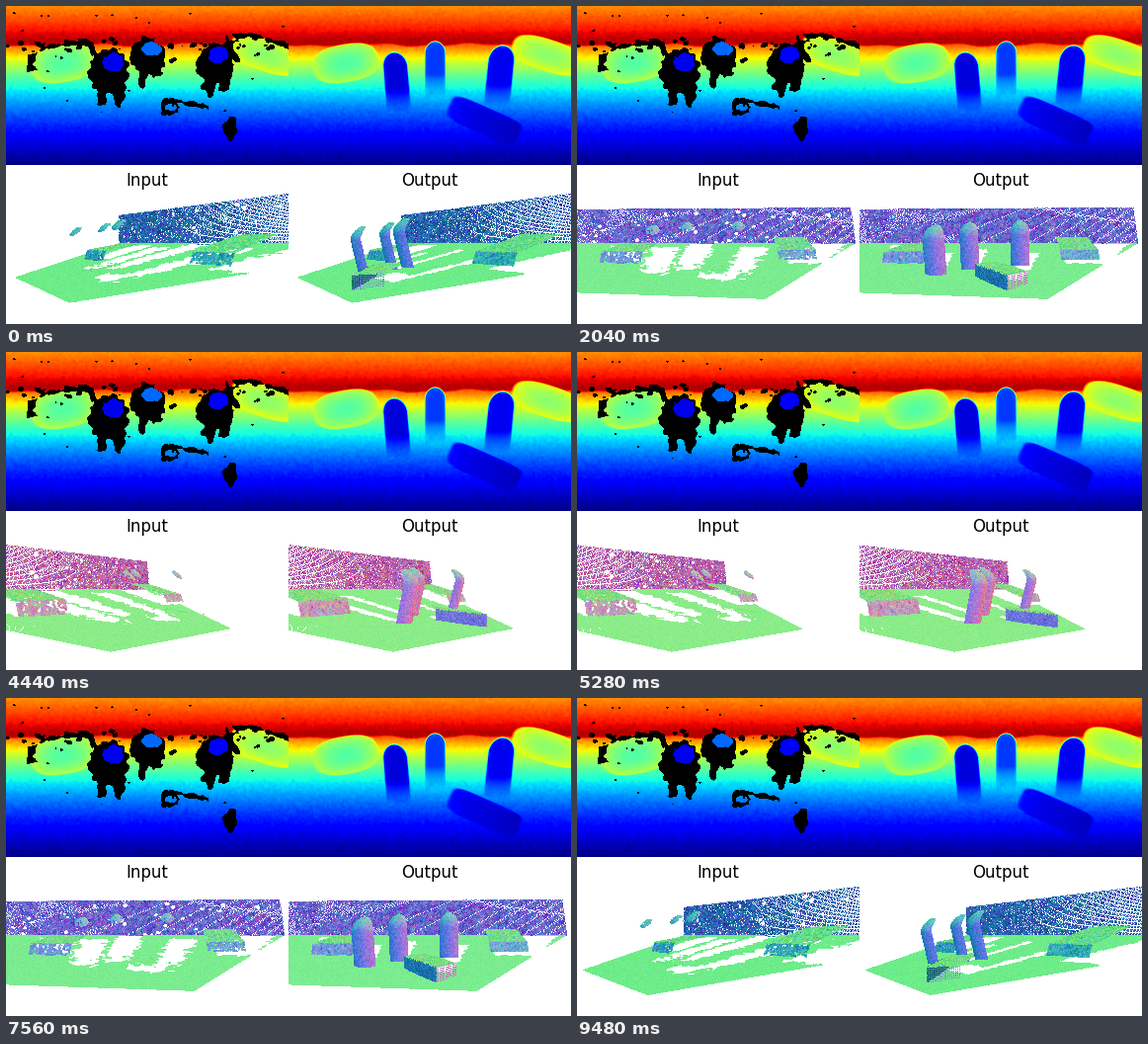
Write a matplotlib script that moves like this. It is 572 px wide and 322 px high and loops after 9.6 s.

```python
import numpy as np
import matplotlib.pyplot as plt
from matplotlib.animation import FuncAnimation
from matplotlib.path import Path

W, H = 572, 322
PW, PH = 286, 161
FRAMES, STEP = 80, 120
rng = np.random.default_rng(7)


def blur(a, k):
    for _ in range(k):
        a = (a + np.roll(a, 1, 0) + np.roll(a, -1, 0)
             + np.roll(a, 1, 1) + np.roll(a, -1, 1)) / 5
    return a / a.std()


def mix(a, b, k):
    return a + (b - a) * k


# ---------- depth maps ----------
yy, xx = np.mgrid[0:PH, 0:PW] + 0.5
grain = blur(rng.normal(size=(PH, PW)), 2)
rough = blur(rng.normal(size=(PH, PW)), 9)
jet = plt.get_cmap("jet")

# centre x, y, half axes, tilt in degrees, edge and core depth
MOUNDS = [(58, 58, 33, 19, -10, .58, .45), (263, 50, 38, 16, 18, .64, .52)]
# centre x, half width, top, bottom, lean, depth
POSTS = [(107, 13, 46, 108, -.08, .08), (148.5, 11, 35, 93, 0, .18), (217, 14, 39, 103, .1, .10)]


def radius(cx, cy, rx, ry, tilt=0, power=2):
    c, s = np.cos(np.radians(tilt)), np.sin(np.radians(tilt))
    x, y = (xx - cx) * c + (yy - cy) * s, (yy - cy) * c - (xx - cx) * s
    return (np.abs(x / rx) ** power + np.abs(y / ry) ** power) ** (1 / power)


def background():
    ridge = 38 + 1.2 * np.sin(xx / 17) + 0.8 * np.sin(xx / 6.3 + 1)
    sky = .76 + .19 * np.clip(yy / 34, 0, 1) ** 1.1
    ground = 166 / (yy + 70) - .709
    v = mix(sky, ground, np.clip((yy - ridge) / 2.5, 0, 1))
    return v + .006 * grain


def add_mounds(v):
    for cx, cy, rx, ry, tilt, edge, core in MOUNDS:
        r = radius(cx, cy, rx, ry, tilt, 2.6)
        body = mix(core, edge, np.clip(r, 0, 1) ** 2)
        v = mix(v, body, np.clip((1.04 - r) * 12, 0, 1))
    return v


def add_posts(v):
    for cx, w, top, bot, lean, val in POSTS:
        x = (xx - cx + lean * (yy - top)) / w
        cap = np.clip((top + 1.2 * w - yy) / (1.2 * w), 0, None)
        r = np.hypot(x, cap)
        body = val + .07 * r ** 5
        fade = np.clip((bot - yy) / 24, 0, 1)
        v = mix(v, body, np.clip((1 - r) * 8, 0, 1) * fade)
    return v


def depth_output():
    v = add_posts(add_mounds(background()))
    r = radius(198, 116, 40, 14, 24, 5)
    body = .10 - .0007 * (xx - 170) + .07 * r ** 6 * (yy < 116)
    v = mix(v, body, np.clip((1 - r) * 12, 0, 1))
    return jet(np.clip(v, 0, 1))[..., :3]


def disc(cx, cy, rx, ry):
    return (1 - radius(cx, cy, rx, ry)) * min(rx, ry)


def depth_input():
    v = add_mounds(background())
    field = np.full(xx.shape, -9.0)
    patches = []
    for cx, w, top, ry, val in [(104, 20, 43, 23, .10), (144, 17, 31, 19, .23),
                                (211, 18, 38, 21, .11)]:
        parts = [disc(cx, top + ry, w, ry), disc(cx - .3 * w, top + 1.9 * ry, .3 * w, .75 * ry),
                 disc(cx + .55 * w, top + 1.7 * ry, .35 * w, .7 * ry)]
        field = np.maximum(field, np.max(parts, axis=0))
        patches.append((disc(cx + 4, top + .6 * ry, .55 * w, .42 * ry), val))
    # ragged upper rims of the mounds
    for cx, cy, rx, ry, tilt, *_ in MOUNDS:
        rim = 2 - np.abs(radius(cx, cy, rx, ry, tilt, 2.6) - 1) * ry
        field = np.maximum(field, np.where(yy < cy + .25 * (cx - xx), rim, -9))
    # remains of the fallen box
    ring = 2.2 - np.abs(radius(166, 102, 7, 6) - 1) * 6
    trail = np.where(np.abs(xx - 188) < 17, 2 - np.abs(yy - 99 - .15 * (xx - 188)), -9)
    field = np.max([field, ring, trail, disc(227, 123, 6, 12)], axis=0)
    mask = field + 1.1 * rough > 0
    for x, y, r in zip(rng.uniform(0, PW, 44), rng.normal(41, 6, 44), rng.uniform(.8, 3, 44)):
        mask |= disc(x, y, r * 1.3, r) + .4 * rough > 0
    for x, y in zip(rng.uniform(0, PW, 26), rng.uniform(4, 110, 26)):
        mask |= disc(x, y, 1.4, 1) > 0
    rgb = jet(np.clip(v, 0, 1))[..., :3]
    rgb[mask] = 0
    for shape, val in patches:
        rgb[shape + .8 * rough > 0] = jet(val)[:3]
    return rgb


# ---------- point cloud: x right, y down, z away ----------
EYE = np.array([0, 0, -1.1])
FAR_Z = .6


def ground_y(z):
    return .176 * (FAR_Z - z)


class Cloud:
    def __init__(self):
        self.pos, self.nrm, self.shade = [], [], []

    def add(self, pos, nrm, keep=None, noise=.05, dark=.1, lumps=0):
        shape = pos.shape[:2]
        n = nrm + noise * rng.normal(size=pos.shape)
        if lumps:
            n = n + lumps * np.dstack([blur(rng.normal(size=shape), 3) for _ in range(3)])
        n /= np.linalg.norm(n, axis=2, keepdims=True)
        keep = np.ones(shape, bool) if keep is None else keep
        self.pos.append(pos[keep])
        self.nrm.append(n[keep])
        self.shade.append(1 - dark * rng.random(keep.sum()))

    def done(self):
        return [np.concatenate(a) for a in (self.pos, self.nrm, self.shade)]


def patch(a, b, c, d, nu, nv):
    a, b, c, d = (np.array(p, float) for p in (a, b, c, d))
    t, s = np.meshgrid(np.linspace(0, 1, nv), np.linspace(0, 1, nu), indexing="ij")
    s, t = s[..., None], t[..., None]
    pos = mix(mix(a, b, s), mix(d, c, s), t)
    n = np.cross(c - a, d - b)
    n /= np.linalg.norm(n)
    if n @ (pos.mean((0, 1)) - EYE) > 0:
        n = -n
    return pos, np.broadcast_to(n, pos.shape)


def floor():
    t, s = np.mgrid[0:1:260j, 0:1:300j]
    z = mix(-.345 - .045 * s, FAR_Z, t)
    x = mix(mix(-.42, .28, s), mix(-.9, .95, s), t)
    n = np.array([0, -.985, -.173])
    pos = np.dstack([x, ground_y(z), z])
    return pos, np.broadcast_to(n, pos.shape)


def shadow(x, z, w, k):
    """Ground hidden behind an object, stretched k times away from the eye."""
    far = EYE[2] + (z - EYE[2]) * k
    return [(x - w, z), (x + w, z), ((x + w) * k, far), ((x - w) * k, far)]


def outside(pos, polys, wobble):
    ok = np.ones(pos.shape[:2], bool)
    bump = np.dstack([wobble * blur(rng.normal(size=ok.shape), 14) for _ in range(2)])
    xz = (pos[..., [0, 2]] + bump).reshape(-1, 2)
    for p in polys:
        ok &= ~Path(p).contains_points(xz).reshape(ok.shape)
    return ok


# x, z, half width, top, bottom
COLUMNS = [(-.15, -.157, .043, -.077, .132),
           (-.02, -.08, .038, -.093, .112),
           (.195, -.15, .036, -.093, .088)]


def column(x, z, r, top, bot):
    """Bulging front shell whose top curls away from the viewer."""
    t, s = np.mgrid[0:1:75j, -1:1:45j]
    y = mix(top, bot, t)
    q = np.clip(1 - (y - top) / (1.6 * r), 0, 1)
    half = np.sqrt(1 - q ** 2)
    pos = np.dstack([x + r * half * s, y, z - .05 + .055 * t + .45 * r * s ** 2 + .06 * q ** 2])
    nrm = np.dstack([.8 * s, -1.3 * q, -np.ones_like(s)])
    return pos, nrm / np.linalg.norm(nrm, axis=2, keepdims=True)


def pile(cloud, x, z, w, base, top, back_top, back, drop):
    a, b = (x - w, base, z), (x + w, base, z)
    c, d = (x + w, top, z + .02), (x - w, top, z + .02)
    e, f = (x + w * 1.1, back_top, z + back), (x - w * .8, back_top, z + back)
    for quad, m in ((patch(a, b, c, d, 70, 18), 18), (patch(d, c, e, f, 70, 60), 60)):
        keep = blur(rng.normal(size=(m, 70)), 4) > drop
        cloud.add(*quad, keep=keep, noise=.12, dark=.15, lumps=.15)


def build(complete):
    cloud = Cloud()
    pos, nrm = floor()
    w, k = (.03, 1.45) if complete else (.06, 1.63)
    holes = [shadow(c[0], c[1] + .03, w, k) for c in COLUMNS]
    holes += [shadow(-.365, .08, .1, 1.4), shadow(.51, .06, .11, 1.46), shadow(.12, -.2, .08, 1.13)]
    cloud.add(pos, nrm, outside(pos, holes, .006 if complete else .015), .05, .05)

    pos, nrm = patch((-.9, .003, FAR_Z), (.96, .003, FAR_Z), (.93, -.23, FAR_Z),
                     (-.9, -.23, FAR_Z), 274, 36)
    pos = pos + [0, 0, 1] * rng.normal(0, .003, pos.shape)
    keep = np.ones(pos.shape[:2], bool)
    if not complete:
        for _ in range(42):
            cx, cy, r = rng.uniform(-.9, .93), rng.uniform(-.22, 0), rng.uniform(.006, .017)
            keep &= np.hypot(pos[..., 0] - cx, (pos[..., 1] - cy) * 1.3) > r
    cloud.add(pos, nrm + [0, .14, 0], keep, .25, .25, .16)

    drop = -9 if complete else -.7
    pile(cloud, -.365, .05, .10, ground_y(.05), .04, 0, .26, drop)
    pile(cloud, .47, .02, .085, .07, .03, -.035, .28, drop)

    for col in COLUMNS:
        pos, nrm = column(*col)
        keep = None
        if not complete:
            dx, dy = pos[..., 0] - col[0], pos[..., 1] - col[3]
            keep = np.hypot((dx - .005) / .026, (dy - .024) / .02) < 1
            keep &= blur(rng.normal(size=keep.shape), 5) > -.4
        cloud.add(pos, nrm, keep, .08, .15, .05)

    # fallen box: front face, end face and top
    p1, p2 = np.array([.02, .135, -.16]), np.array([.15, .158, -.33])
    up, back = np.array([0, -.05, 0]), np.array([.07, -.006, .085])
    lid = patch(p1 + up, p2 + up, p2 + up + back, p1 + up + back, 75, 45)
    if complete:
        cloud.add(*lid, noise=.1, dark=.15, lumps=.12)
        cloud.add(*patch(p1, p2, p2 + up, p1 + up, 90, 22), noise=.1, dark=.2, lumps=.08)
        cloud.add(*patch(p2, p2 + back, p2 + up + back, p2 + up, 18, 9), noise=.1)
    else:
        cloud.add(*lid, keep=blur(rng.normal(size=(45, 75)), 6) > 1.4, noise=.15)
    return cloud.done()


def render(cloud, phi):
    pos, nrm, shade = cloud
    c, s = np.cos(phi), np.sin(phi)
    x, y, z = pos.T
    depth = x * s + z * c + 1.32
    u = np.floor(143 + 293 * (x * c - z * s - .11) / depth).astype(int)
    v = np.floor(79.5 + 293 * y / depth).astype(int)
    nx, ny, nz = nrm.T
    # normals as seen by the turning camera become colours
    rgb = np.column_stack([nx * c - nz * s, -ny, -(nx * s + nz * c)])
    rgb = (.5 + .46 * rgb) * shade[:, None]
    order = np.flatnonzero((u >= 0) & (u < PW) & (v >= 0) & (v < PH))
    order = order[np.argsort(-depth[order])]
    img = np.ones((PH, PW, 3))
    img[v[order], u[order]] = rgb[order]
    return img


# ---------- figure ----------
fig = plt.figure(figsize=(W / 100, H / 100), dpi=100)
ax = fig.add_axes([0, 0, 1, 1])
canvas = np.ones((H, W, 3))
canvas[:PH, :PW] = depth_input()
canvas[:PH, PW:] = depth_output()
sparse, dense = build(False), build(True)

picture = ax.imshow(canvas, extent=(0, W, H, 0), interpolation="nearest", aspect="auto")
for x, word in [(142.7, "Input"), (428.5, "Output")]:
    ax.text(x, 182, word, family="DejaVu Sans", size=12, color="black", ha="center", va="baseline")
ax.set_xlim(0, W)
ax.set_ylim(H, 0)
ax.axis("off")


def update(i):
    swing = min(i, FRAMES - i)
    phi = np.radians(-50 + 2.75 * swing)
    canvas[PH:, :PW] = render(sparse, phi)
    canvas[PH:, PW:] = render(dense, phi)
    picture.set_data(canvas.copy())
    return [picture]


anim = FuncAnimation(fig, update, frames=FRAMES, interval=STEP, repeat=True, repeat_delay=0)
plt.show()
```
